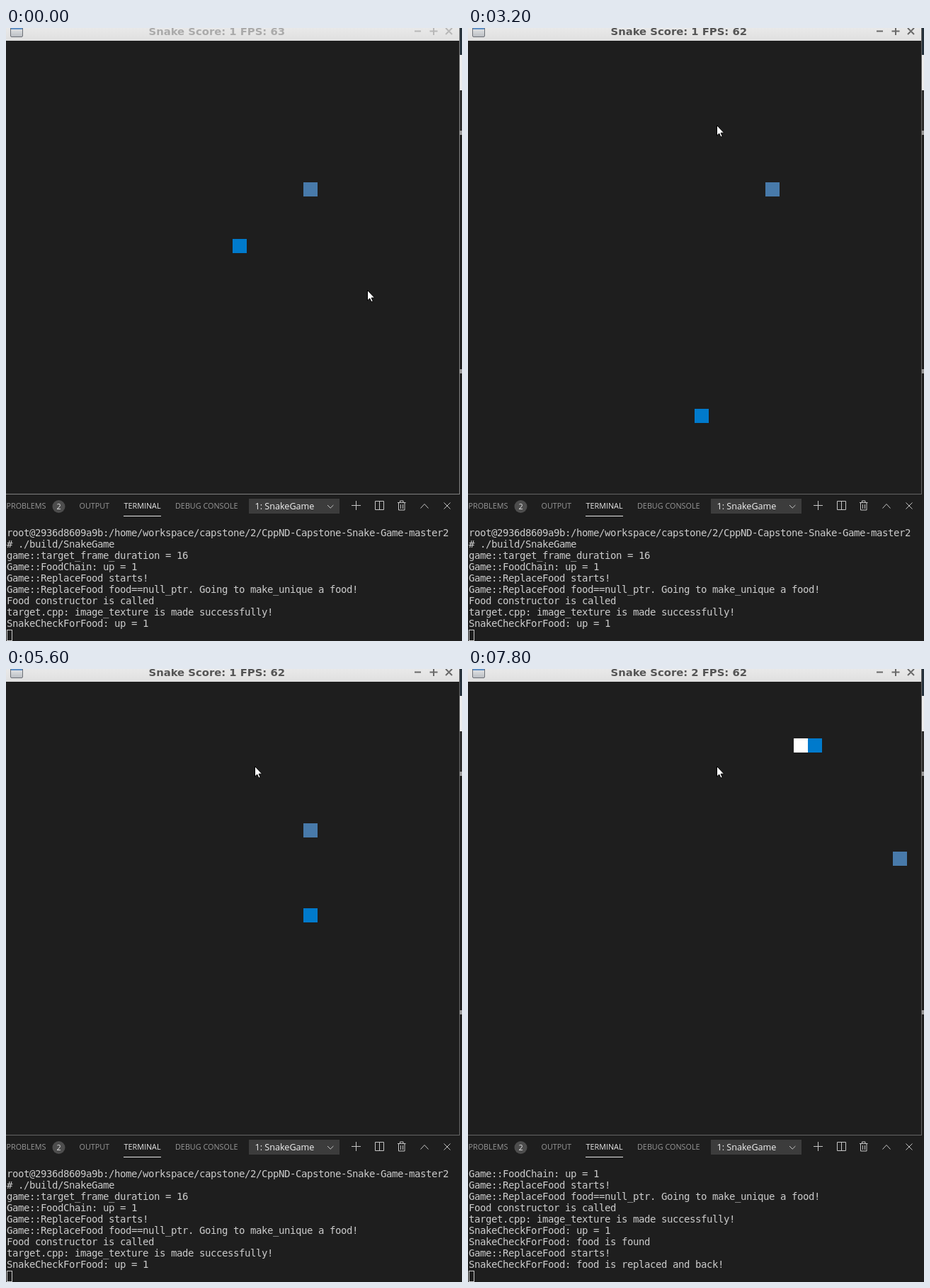
Recreate the animation shown at these times as an HTML page. Size 644x866 px, loop 8000 ms.

```html
<!DOCTYPE html>
<html lang="en">
<head>
<meta charset="utf-8">
<title>Snake</title>
<style>
  html, body { margin: 0; width: 100%; height: 100%; overflow: hidden; background: #1e1e1e; }
  svg { display: block; }
  .crisp { shape-rendering: crispEdges; }
  .title { font: bold 14.8px "DejaVu Sans", sans-serif; }
  .tabs { font: 10.8px "Open Sans", "Noto Sans", sans-serif; fill: #989898; }
  .tabs .on { fill: #e7e7e7; }
  .pick { font: 12.6px "Open Sans", "Noto Sans", sans-serif; fill: #f0f0f0; }
  .term { font: 14px "DejaVu Sans Mono", monospace; letter-spacing: -0.43px; fill: #ccc; white-space: pre; }
  .icon { fill: none; stroke: #c5c5c5; }
  #win { --ink: #aaa; --btn: #b8b8b8; --edge: #808080; }
  #win.focus { --ink: #555; --btn: #6a6a6a; --edge: #646464; }
  .title { fill: var(--ink); }
  .btn { fill: none; stroke: var(--btn); stroke-width: 2; }
  .edge { fill: none; stroke: var(--edge); }
</style>
</head>
<body>
<svg width="644" height="866" viewBox="0 0 644 866">
  <defs>
    <linearGradient id="bar" x2="0" y2="1">
      <stop stop-color="#e9e9e9"/><stop offset="1" stop-color="#e0e0e0"/>
    </linearGradient>
    <linearGradient id="pane" x2="0" y2="1">
      <stop stop-color="#f4f4f4"/><stop offset="1" stop-color="#b9bdc2"/>
    </linearGradient>
  </defs>
  <rect width="644" height="866" fill="#1e1e1e"/>

  <!-- strip right of the window -->
  <g class="crisp">
    <rect x="641" width="3" height="38" fill="#25313b"/>
    <rect x="641" y="38" width="3" height="50" fill="#ececec"/>
    <rect x="641" y="88" width="3" height="57" fill="#2b2b2b"/>
    <rect x="641" y="145" width="3" height="6" fill="#9a9a9a"/>
    <rect x="641" y="482" width="3" height="6" fill="#9a9a9a"/>
  </g>

  <g id="win">
    <rect class="crisp" width="640" height="18" fill="url(#bar)"/>
    <rect x="6.5" y="-4" width="17" height="16.5" rx="1.5" fill="url(#pane)" stroke="#6c7076"/>
    <rect x="7" width="16" height="2" fill="#5f8fc4"/>
    <text class="title" id="title" x="201.5" y="10"></text>
    <path class="btn" d="M577 4.5h9M598.5 4.5h11M604 -1v11M621 0l9 9M630 0l-9 9"/>
    <path class="edge crisp" d="M0 658.5H640.5V0"/>
  </g>

  <g class="crisp">
    <rect id="body" width="20" height="20" fill="#fff"/>
    <rect id="head" width="20" height="20" fill="#007acc"/>
    <rect id="food" width="20" height="20" fill="#487aaa"/>
  </g>

  <g class="tabs">
    <text x="0.5" y="679">PROBLEMS</text>
    <circle cx="74.5" cy="676" r="9" fill="#4d4d4d"/>
    <text class="on" x="74.5" y="680" text-anchor="middle">2</text>
    <text x="103.5" y="679">OUTPUT</text>
    <text class="on" x="166.5" y="679">TERMINAL</text>
    <text x="239" y="679">DEBUG CONSOLE</text>
  </g>
  <rect class="crisp" x="166" y="689" width="53" height="1" fill="#e7e7e7"/>
  <rect class="crisp" x="343" y="665" width="128" height="21" fill="#3c3c3c"/>
  <text class="pick" x="351.5" y="680">1: SnakeGame</text>
  <g class="icon">
    <path d="M454 674l4.2 4.2 4.2-4.2"/>
    <path d="M488 674.5h13M494.5 668v13"/>
    <path d="M521.5 668.5h12v12h-12zM527.5 668.5v12"/>
    <path d="M553 670.5h11.5M556.5 670v-2h4.500v2M554.500 671v10h8.500v-10M557.500 673v6M560.500 673v6"/>
    <path d="M585.500 678.500l5.500-6 5.500 6"/>
    <path d="M618.500 670.500l9 9M627.500 670.500l-9 9"/>
  </g>

  <g class="term" id="term"></g>
  <rect class="crisp" x="1.5" y="850.5" width="7" height="15" fill="none" stroke="#ccc"/>

  <path id="mouse" d="M.5 .5v14.500l3.200-3 2.300 5 2.300-1-2.200-4.800h4.600z" fill="#fff" stroke="#000"/>
</svg>
<script>
const LOOP = 8000, CELL = 20, TOP = 18, FIELD = 640;
const EATEN = 6700, GROWN = 6900;
const $ = id => document.getElementById(id);

// time in tenths of a second, then the cells travelled since the last update
const route = ("1U 3U 4U 6U 7U 9U 10U 12U 13U 15U 16U 18U 20U 21U 23U 32UUUUU " +
  "33U 35U 36R 38R 39R 42R 44U 45U 47U 50UU 51U 53U 54U 56R 57U 60UU " +
  "63U 65U 67U 69UU 70U 72U 75UU 77RR 78R").split(" ");

const log = `root@2936d8609a9b:/home/workspace/capstone/2/CppND-Capstone-Snake-Game-master2
# ./build/SnakeGame
game::target_frame_duration = 16
Game::FoodChain: up = 1
Game::ReplaceFood starts!
Game::ReplaceFood food==null_ptr. Going to make_unique a food!
Food constructor is called
target.cpp: image_texture is made successfully!
SnakeCheckForFood: up = 1
SnakeCheckForFood: food is found
Game::ReplaceFood starts!
SnakeCheckForFood: food is replaced and back!`.split("\n");

const titles = [
  [0, "Snake Score: 1 FPS: 63"],
  [3200, "Snake Score: 1 FPS: 62"],
  [6300, "Snake Score: 1 FPS: 63"],
  [7200, "Snake Score: 2 FPS: 62"]
];
const pointer = [[0, [510, 370]], [2200, [405, 214]], [2300, [362, 152]], [2400, [351, 137]]];

const rows = Array.from({ length: 9 }, (_, i) => {
  const row = document.createElementNS("http://www.w3.org/2000/svg", "text");
  row.setAttribute("x", 1);
  row.setAttribute("y", 718 + 16 * i);
  return $("term").appendChild(row);
});

const current = (list, t) => list.filter(([at]) => at <= t).pop()[1];
const place = (id, [x, y]) => $(id).setAttribute("transform", `translate(${x} ${y})`);
const setText = (el, text) => { if (el.textContent !== text) el.textContent = text; };

function snakeAt(t) {
  let head = [320, 298], tail = head;
  for (const leg of route) {
    if (parseInt(leg) * 100 > t) break;
    for (const dir of leg.replace(/\d/g, "")) {
      tail = head;
      const [x, y] = head;
      head = dir === "R" ? [x + CELL, y] : [x, (y - CELL - TOP + FIELD) % FIELD + TOP];
    }
  }
  return { head, tail };
}

function draw(now) {
  const t = now % LOOP;
  const { head, tail } = snakeAt(t);
  place("head", head);
  place("body", t < GROWN ? head : tail);
  place("food", t < EATEN ? [420, 218] : [600, 258]);
  place("mouse", current(pointer, t));
  $("win").classList.toggle("focus", t >= 3200);
  setText($("title"), current(titles, t));
  const scroll = t < EATEN ? 0 : 3;
  rows.forEach((row, i) => setText(row, log[i + scroll]));
  requestAnimationFrame(draw);
}
draw(0);
</script>
</body>
</html>
```
